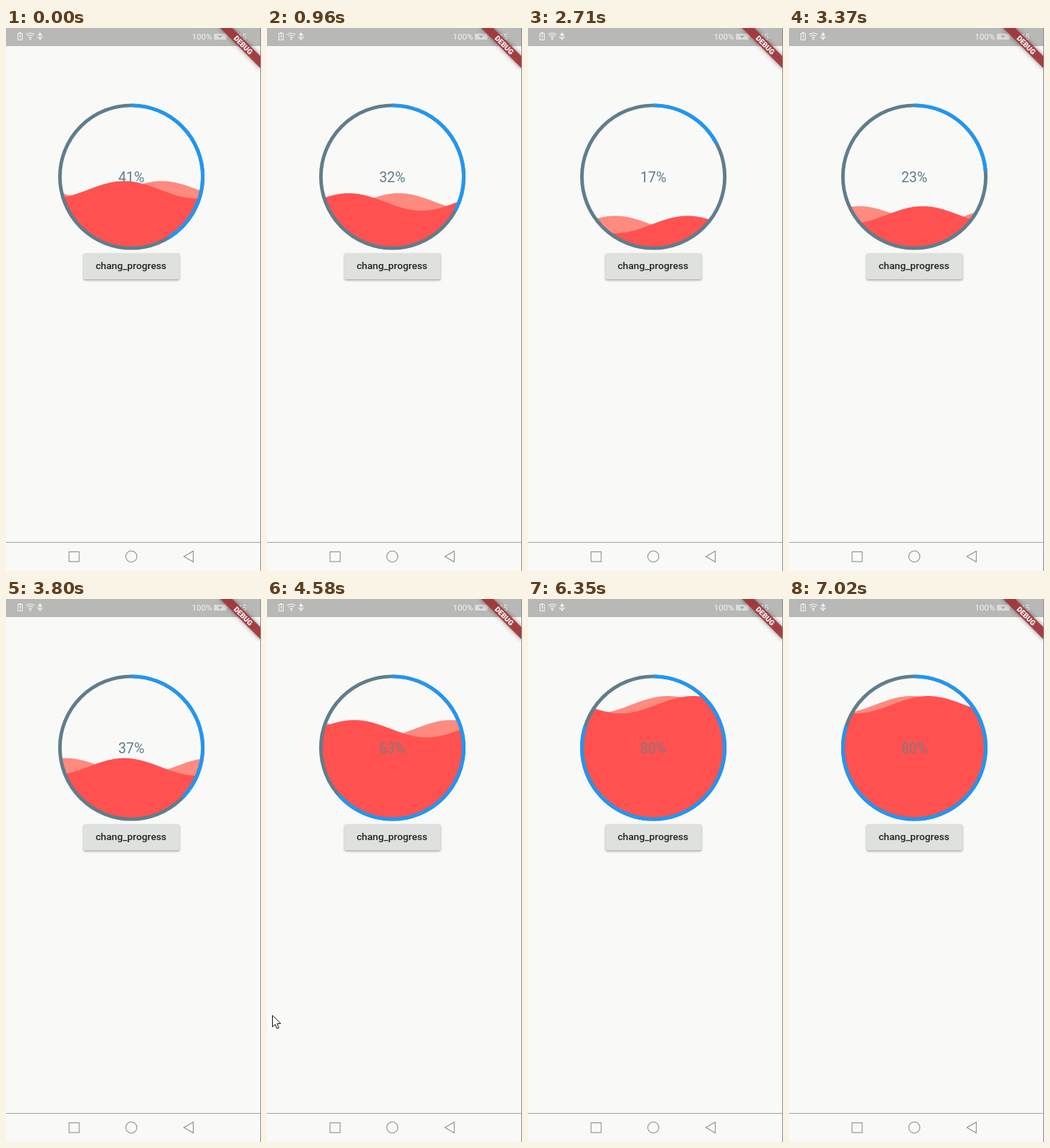
An HTML page with a canvas for the animation above (7.12 s loop, 352 by 750 pixels).

```html
<!DOCTYPE html>
<html lang="en">
<head>
<meta charset="utf-8">
<title>Wave progress</title>
<style>
  html, body { margin: 0; width: 100%; height: 100%; overflow: hidden; background: #f9faf8; }
  canvas { display: block; }
</style>
</head>
<body>
<canvas id="stage" width="352" height="750"></canvas>
<script>
const ctx = document.getElementById('stage').getContext('2d');
const TAU = Math.PI * 2;
const LOOP = 7120, STEP = 135;
const CX = 173, CY = 205.5, RADIUS = 98.6;

function text(str, x, y, font, color, align = 'left') {
  ctx.font = font + ' Roboto, sans-serif';
  ctx.fillStyle = color;
  ctx.textAlign = align;
  ctx.fillText(str, x, y);
}

function poly(points, close = true) {
  ctx.beginPath();
  points.forEach(([x, y]) => ctx.lineTo(x, y));
  if (close) ctx.closePath();
}

function arc(x, y, r, from, to, color, width) {
  ctx.beginPath();
  ctx.arc(x, y, r, from, to);
  ctx.strokeStyle = color;
  ctx.lineWidth = width;
  ctx.stroke();
}

function shadow(color, blur, dy = 0) {
  ctx.shadowColor = color;
  ctx.shadowBlur = blur;
  ctx.shadowOffsetY = dy;
}

// Falls to 15, then climbs to 80 in two seconds.
function progressAt(s) {
  return s < 3.1 ? Math.max(15, 41.3 - 8.9 * s) : Math.min(80, 15 + 32.5 * (s - 3.1));
}

function wave(crest, level, color) {
  ctx.beginPath();
  for (let x = 70; x <= 276; x++) ctx.lineTo(x, level - 12 * Math.cos((x - crest) / 200 * TAU));
  ctx.lineTo(276, 310);
  ctx.lineTo(70, 310);
  ctx.fillStyle = color;
  ctx.fill();
}

function gauge(s) {
  const p = progressAt(s), level = 306 - 2 * p, top = -TAU / 4;
  ctx.save();
  ctx.beginPath();
  ctx.arc(CX, CY, 97, 0, TAU);
  ctx.clip();
  wave(215 - 35 * s, level, '#ff8a80');
  wave(163 - 52.85 * s, level, '#ff5250');
  ctx.restore();
  arc(CX, CY, RADIUS, 0, TAU, '#607d8b', 4.9);
  arc(CX, CY, RADIUS, top, top + TAU * p / 100, '#2196f3', 4.9);
  text(Math.floor(p) + '%', CX, 213, '19.5px', p > 52 ? '#85767b' : '#607d8b', 'center');
}

function button() {
  ctx.save();
  shadow('rgba(0,0,0,.35)', 3, 1.5);
  ctx.fillStyle = '#dfe1de';
  ctx.beginPath();
  ctx.roundRect(107, 311, 132.5, 36, 2);
  ctx.fill();
  ctx.restore();
  text('chang_progress', CX - .5, 333, '500 13.7px', '#222322', 'center');
}

function statusBar() {
  ctx.fillStyle = '#b8b8b6';
  ctx.fillRect(0, 0, 352, 25);
  ctx.strokeStyle = ctx.fillStyle = '#f4f4f4';
  ctx.lineWidth = 1;
  ctx.strokeRect(16.5, 7.5, 6, 9);
  ctx.fillRect(18, 6, 3, 1);
  ctx.fillRect(19, 9, 1.2, 4);
  ctx.fillRect(19, 14, 1.2, 1.2);
  for (const r of [3, 6, 9]) arc(33.5, 16, r, -TAU * .36, -TAU * .14, '#f4f4f4', 1.2);
  ctx.fillRect(32.5, 14.5, 2, 2);
  poly([[47, 17], [47, 7], [49, 9.5], [45, 9.5], [47, 7]], false);
  ctx.stroke();
  poly([[44, 11.5], [44, 13], [47, 15], [50, 13], [50, 11.5]], false);
  ctx.stroke();
  text('100%', 256.5, 16, '11.5px', '#f4f4f4');
  ctx.fillStyle = '#dcdcdb';
  ctx.fillRect(287, 8, 17, 8);
  ctx.fillRect(304, 10.5, 1.5, 3);
  ctx.fillStyle = '#a8a8a6';
  poly([[292, 10.5], [299, 10.5], [295.5, 14]]);
  ctx.fill();
  text('5:45', 310, 16, '11.5px', '#f0f0f0');
}

function banner() {
  ctx.save();
  ctx.translate(351, 0);
  ctx.rotate(TAU / 8);
  shadow('rgba(0,0,0,.5)', 6);
  ctx.fillStyle = 'rgba(168,52,56,.9)';
  ctx.fillRect(-40, 27.4, 80, 11.7);
  shadow('transparent', 0);
  text('DEBUG', 0, 36.8, '900 10px', '#fff', 'center');
  ctx.restore();
}

function navBar() {
  ctx.fillStyle = '#a2a3a2';
  ctx.fillRect(0, 710, 352, 1);
  arc(CX, 730, 7.7, 0, TAU, '#8e8f8e', 1.1);
  ctx.strokeRect(87, 723.5, 14, 13.5);
  poly([[245.5, 730], [258.5, 722.5], [258.5, 737.5]]);
  ctx.stroke();
}

function pointer(s) {
  if (s < 4.55 || s > 5.75) return;
  const slow = Math.min(1, (s - 4.59) / .81), fast = Math.max(0, (s - 5.4) / .27);
  ctx.save();
  ctx.translate(7.5 + 8 * slow + 212 * fast, 575 + 34 * slow + 111 * fast);
  poly([[0, 0], [0, 16], [3.8, 12.6], [6.2, 18.4], [8.8, 17.3], [6.4, 11.7], [11.4, 11.4]]);
  ctx.fillStyle = '#fff';
  ctx.fill();
  ctx.strokeStyle = '#111';
  ctx.lineWidth = 1;
  ctx.stroke();
  ctx.restore();
}

const start = performance.now();

function draw() {
  const ms = (performance.now() - start) % LOOP;
  const s = Math.floor(ms / STEP + .1) * STEP / 1000;
  ctx.fillStyle = '#f9faf8';
  ctx.fillRect(0, 0, 352, 750);
  statusBar();
  gauge(s);
  button();
  navBar();
  banner();
  ctx.fillStyle = '#8a8a8a';
  ctx.fillRect(351, 0, 1, 750);
  pointer(s);
  requestAnimationFrame(draw);
}
draw();
</script>
</body>
</html>
```
